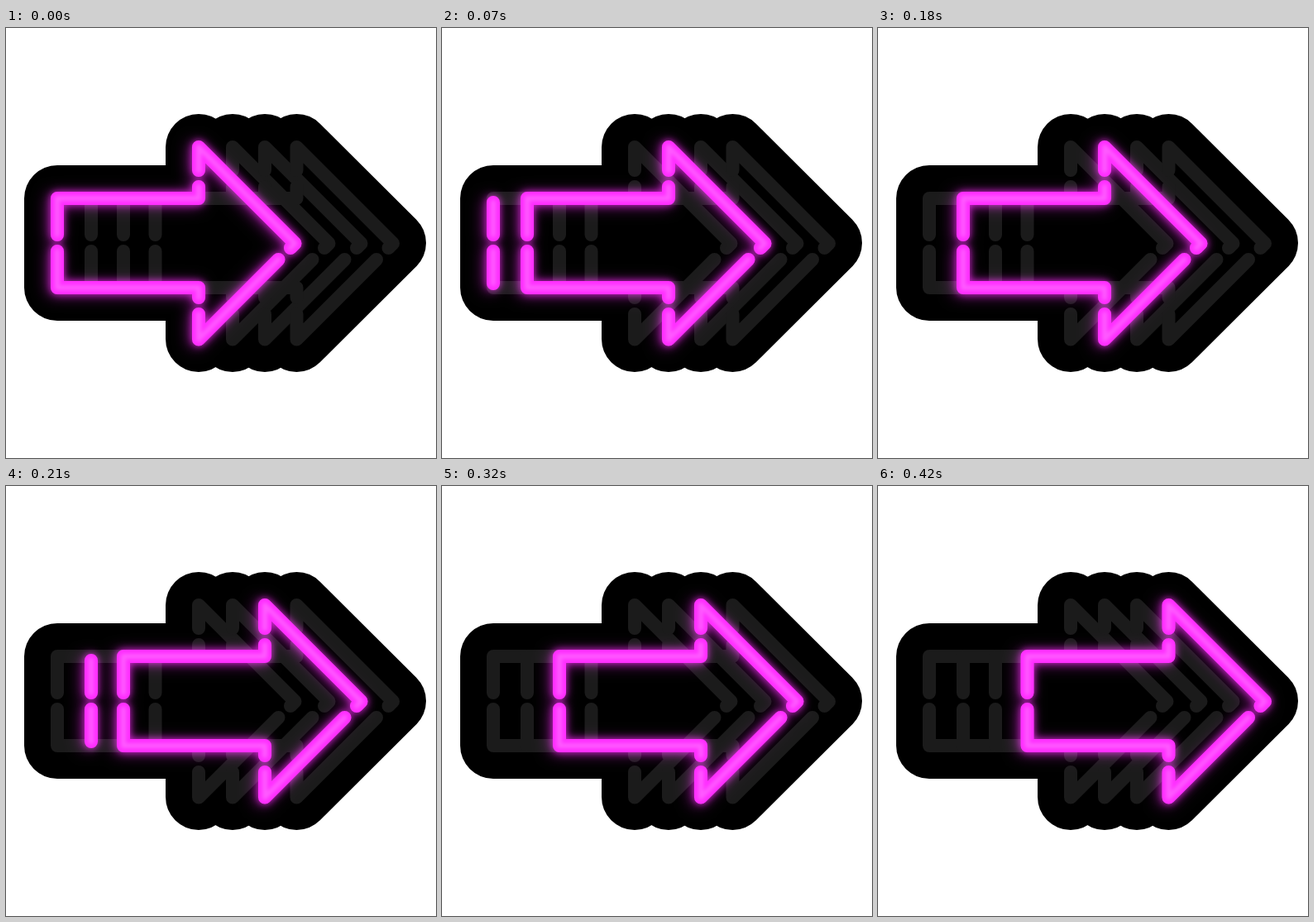
These frames come from a looping animation (520 by 520 pixels, 490 ms). An HTML page with a canvas:

```html
<!DOCTYPE html>
<html lang="en">
<head>
<meta charset="utf-8">
<title>Neon arrow</title>
<style>
  html, body { margin: 0; width: 100%; height: 100%; overflow: hidden; background: #fff; }
  canvas { display: block; }
</style>
</head>
<body>
<canvas id="stage" width="520" height="520"></canvas>
<script>
const ctx = document.getElementById('stage').getContext('2d');
const STEP = 70, STEPS = 7;
const OFFSETS = [0, 41, 80, 118.5];
const FAR = 2000; // moves a shape off stage so that only its shadow shows

const outline = 'M62 206H233V144L349.5 260L233 376V314H62Z';
const tubes = 'M62 250V206H233V192 M62 270V314H233V326' +
  'M233 172V144L349.5 260.5L344 266 M329.5 280L233 376.5V346';
const bars = 'M62 211V250 M62 270V309';

const shifted = (d, dx) => {
  const path = new Path2D();
  path.addPath(new Path2D(d), new DOMMatrix([1, 0, 0, 1, dx, 0]));
  return path;
};

function stroke(path, width, color) {
  ctx.lineWidth = width;
  ctx.strokeStyle = color;
  ctx.stroke(path);
}

function glow(path, width, color, sigma, dx = 0, dy = 0) {
  ctx.save();
  ctx.globalCompositeOperation = 'screen';
  ctx.shadowColor = color;
  ctx.shadowBlur = sigma * 2;
  ctx.shadowOffsetX = FAR + dx;
  ctx.shadowOffsetY = dy;
  ctx.translate(-FAR, 0);
  stroke(path, width, '#000');
  ctx.restore();
}

function draw(step) {
  ctx.fillStyle = '#fff';
  ctx.fillRect(0, 0, 520, 520);
  ctx.lineCap = ctx.lineJoin = 'round';

  ctx.fillStyle = '#000';
  for (const dx of OFFSETS) {
    const body = shifted(outline, dx);
    ctx.fill(body);
    stroke(body, 80, '#000');
  }
  for (const dx of OFFSETS) stroke(shifted(tubes, dx), 16, '#1b1b1b');

  // Odd steps keep the previous arrow's tail bars lit.
  const active = (step + 1) >> 1;
  const lit = shifted(tubes, OFFSETS[active]);
  if (step % 2) lit.addPath(shifted(bars, OFFSETS[active - 1]));

  glow(lit, 16, 'rgba(255, 30, 255, .45)', 9, -4, 2);
  glow(lit, 17, 'rgba(255, 40, 255, .7)', 4.5);
  stroke(lit, 16, '#ff2eff');
  glow(lit, 6, 'rgba(255, 90, 255, .6)', 2);
}

function tick(now) {
  draw(Math.floor(now / STEP) % STEPS);
  requestAnimationFrame(tick);
}
draw(0);
requestAnimationFrame(tick);
</script>
</body>
</html>
```
